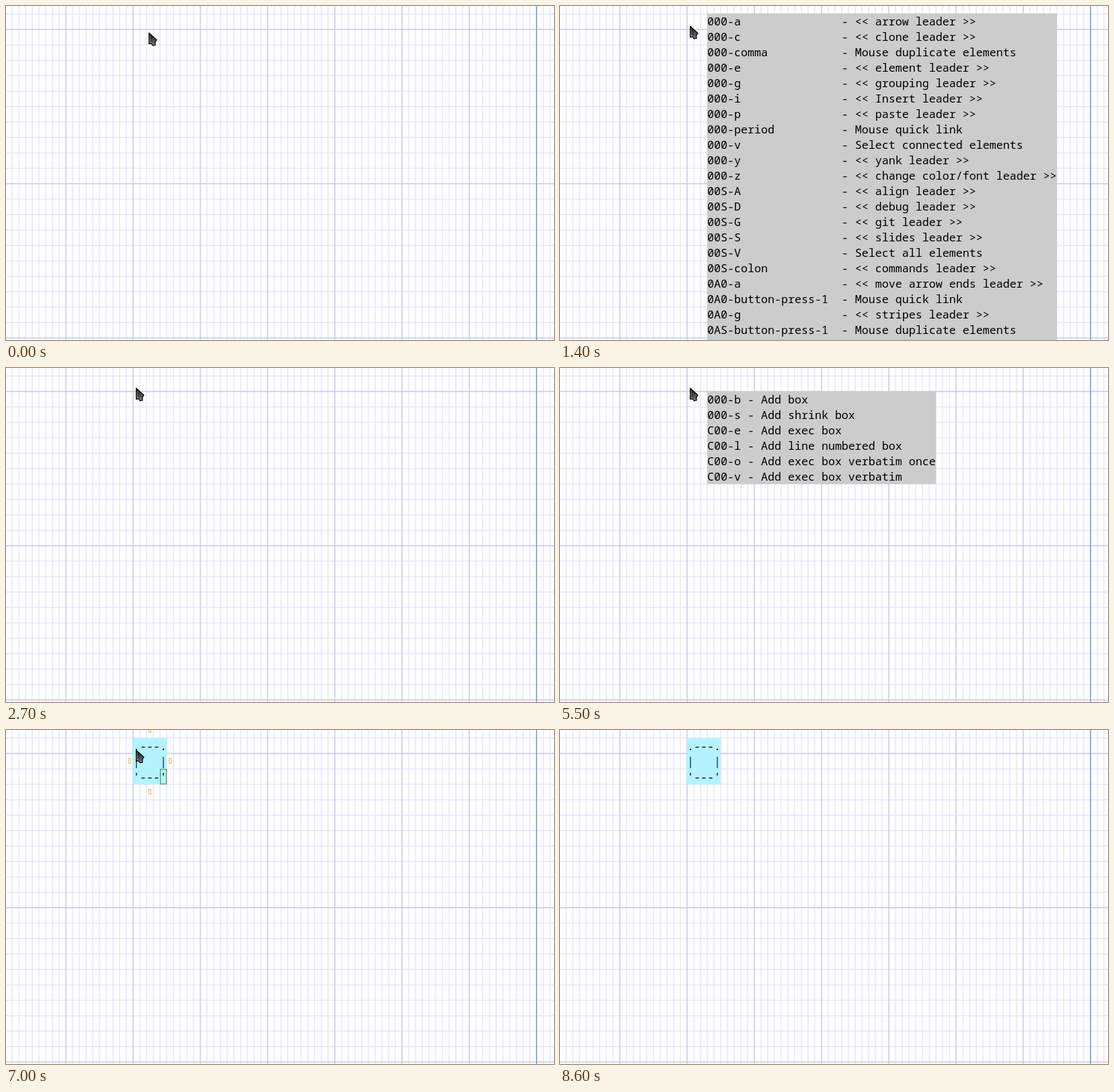
Recreate the animation shown at these times as an HTML page. Size 815 px wide and 498 px high, loop 9300 ms.

```html
<!DOCTYPE html>
<html lang="en">
<head>
<meta charset="utf-8">
<title>Diagram editor menus</title>
<style>
  html, body { margin: 0; width: 100%; height: 100%; overflow: hidden; background: #fff; }
  svg { display: block; width: 815px; height: 498px; }
  text { font: 16.667px "Noto Sans Mono", monospace; white-space: pre; }
</style>
</head>
<body>
<svg id="stage" viewBox="0 0 815 498" xmlns="http://www.w3.org/2000/svg">
  <defs>
    <linearGradient id="shade" x1="0" y1="0" x2=".7" y2="1">
      <stop offset=".2" stop-color="#1c1c1a"/>
      <stop offset="1" stop-color="#74746e"/>
    </linearGradient>
  </defs>
  <g id="grid"></g>
  <g id="box"></g>
  <g id="hover" fill="none"></g>
  <g id="menus"></g>
  <g id="cursor">
    <path d="M.7 1.2V17.6L4 16.9L6.4 19.8L10 19.2L9.8 14.8L12 11.4Z" fill="url(#shade)" stroke="#000" stroke-width="1.3" stroke-linejoin="round"/>
    <path d="M1.9 4.5V16L4.5 15.5L7 18.2L8.8 18" fill="none" stroke="#a4a49c" stroke-width=".8"/>
  </g>
</svg>
<script>
const W = 815, H = 498, COL = 10, ROW = 23, LOOP = 9300;
const $ = id => document.getElementById(id);

function add(parent, tag, attrs, text) {
  const el = document.createElementNS("http://www.w3.org/2000/svg", tag);
  for (const key in attrs) el.setAttribute(key, attrs[key]);
  if (text !== undefined) el.textContent = text;
  parent.appendChild(el);
  return el;
}

const rect = (parent, x, y, width, height, style) =>
  add(parent, "rect", { x, y, width, height, ...style });

const write = (parent, x, top, text, fill = "#000") =>
  add(parent, "text", { x, y: top + 18, fill }, text);

function drawGrid() {
  const grid = $("grid");
  const line = (d, stroke) => add(grid, "path", { d, stroke });
  const lines = (dx, dy) => {
    let d = "";
    for (let x = 89 % dx; x < W; x += dx) d += `M${x} 0V${H}`;
    for (let y = 35 % dy; y < H; y += dy) d += `M0 ${y}H${W}`;
    return d;
  };
  line(lines(COL, ROW), "#dadaff");
  line(lines(COL * 10, ROW * 10), "#bfbfdc");
  line(`M789 0V${H}`, "#3f8ce0");
}

function drawBox() {
  const box = $("box"), hover = $("hover");
  rect(box, 189, 12, 50, 69, { fill: "#b3f3ff" });
  write(box, 189, 12, ".---.");
  write(box, 189, 35, "|   |", "#002050");
  write(box, 189, 58, "'---'");
  rect(hover, 229.5, 58.5, 9, 22, { stroke: "#3c8c3c" });
  for (const [x, y] of [[184, 46], [244, 46], [214, 92], [214, 0]])
    rect(hover, x - 1.5, y - 3.5, 3, 7, { stroke: "#f0b452" });
}

// Each row is "key|label"; labels start after the padded key column.
function makeMenu(top, keyCols, cols, height, rows) {
  const menu = add($("menus"), "g", {});
  rect(menu, 219, top, cols * COL, height, { fill: "#ccc" });
  rows.forEach((row, i) => {
    const [key, label] = row.split("|");
    write(menu, 219, top + i * ROW, key.padEnd(keyCols) + "- " + label);
  });
  return menu;
}

drawGrid();
drawBox();

const mainMenu = makeMenu(11, 20, 52, 487, [
  "000-a|<< arrow leader >>",
  "000-c|<< clone leader >>",
  "000-comma|Mouse duplicate elements",
  "000-e|<< element leader >>",
  "000-g|<< grouping leader >>",
  "000-i|<< Insert leader >>",
  "000-p|<< paste leader >>",
  "000-period|Mouse quick link",
  "000-v|Select connected elements",
  "000-y|<< yank leader >>",
  "000-z|<< change color/font leader >>",
  "00S-A|<< align leader >>",
  "00S-D|<< debug leader >>",
  "00S-G|<< git leader >>",
  "00S-S|<< slides leader >>",
  "00S-V|Select all elements",
  "00S-colon|<< commands leader >>",
  "0A0-a|<< move arrow ends leader >>",
  "0A0-button-press-1|Mouse quick link",
  "0A0-g|<< stripes leader >>",
  "0AS-button-press-1|Mouse duplicate elements"
]);

const insertMenu = makeMenu(35, 6, 33, 230, [
  "000-a|Add arrow",
  "000-b|<< Box >>",
  "000-e|<< Elements >>",
  "000-k|Add ascii no-connect line",
  "000-l|Add ascii line",
  "000-m|<< Multiple >>",
  "000-r|<< Ruler >>",
  "000-t|Add text",
  "000-u|<< Unicode >>",
  "00S-A|Add angled arrow"
]);

const boxMenu = makeMenu(35, 6, 34, 138, [
  "000-b|Add box",
  "000-s|Add shrink box",
  "C00-e|Add exec box",
  "C00-l|Add line numbered box",
  "C00-o|Add exec box verbatim once",
  "C00-v|Add exec box verbatim"
]);

// Pointer stops: start time, x, y
const stops = [
  [0, 212, 39], [100, 205, 39], [200, 194, 37], [300, 188, 36],
  [500, 190, 32], [600, 193, 29], [8500, 117, 26]
];

function render(t) {
  const show = (el, from, to) =>
    el.setAttribute("visibility", t >= from && t < to ? "visible" : "hidden");
  show(mainMenu, 1400, 2700);
  show(insertMenu, 4100, 5500);
  show(boxMenu, 5500, 7000);
  show($("box"), 7000, LOOP);
  show($("hover"), 7000, 8500);
  show($("cursor"), 0, 8600);
  const [, x, y] = stops.filter(s => s[0] <= t).pop();
  $("cursor").setAttribute("transform", `translate(${x} ${y})`);
}

const start = performance.now();
function tick() {
  render((performance.now() - start) % LOOP);
  requestAnimationFrame(tick);
}
tick();
</script>
</body>
</html>
```
